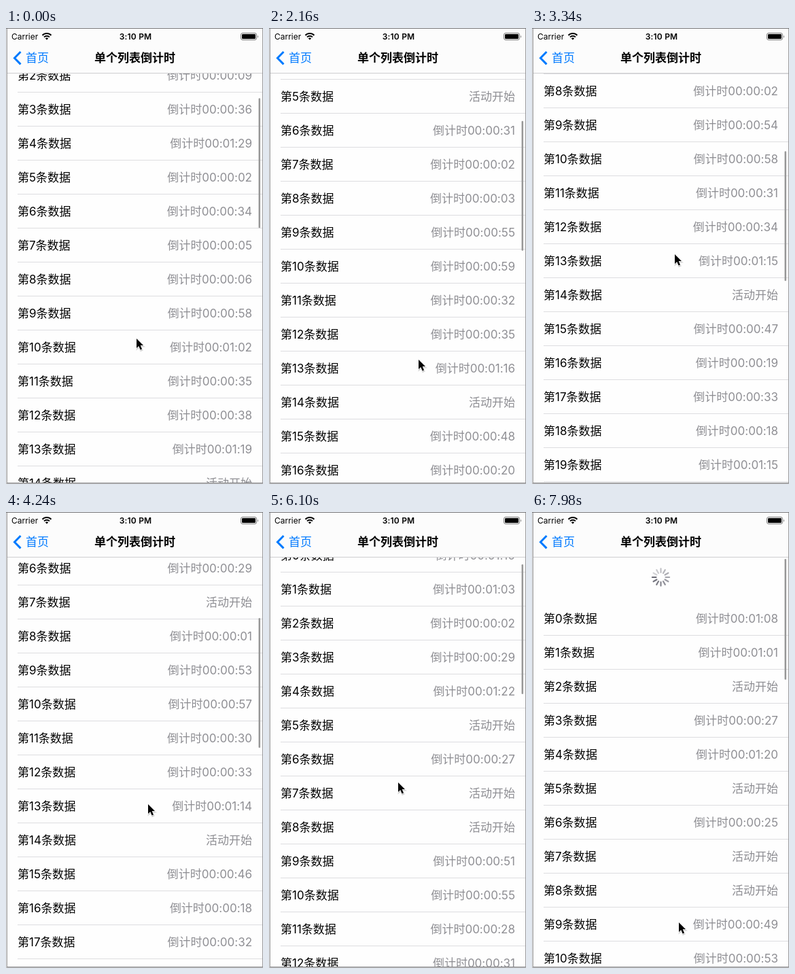
Animation of 378 by 671 pixels, one loop 8000 ms. Source, as an HTML page:

```html
<!DOCTYPE html>
<html lang="zh-CN">
<head>
<meta charset="utf-8">
<title>单个列表倒计时</title>
<style>
  html, body { margin: 0; width: 100%; height: 100%; overflow: hidden; background: #fff; }
  svg { display: block; }
  text { font: 17px Inter, "Noto Sans CJK SC", "Noto Sans CJK", sans-serif; font-feature-settings: "calt" 0; }
  .title { font-weight: 600; text-anchor: middle; }
  .status { font-size: 12px; }
  .clock { font-weight: 600; text-anchor: middle; letter-spacing: .2px; }
  .left { text-anchor: end; fill: #8e8e93; }
  .blue { fill: #007aff; }
</style>
</head>
<body>
<svg width="378" height="671" viewBox="0 0 378 671">
  <defs><clipPath id="view"><rect x="2" y="67" width="375" height="602"/></clipPath></defs>
  <rect width="378" height="671" fill="#fefefe"/>
  <g clip-path="url(#view)">
    <g id="spinner" transform="translate(189.5 96)" stroke="#6b6b76" stroke-width="2.2" stroke-linecap="round"></g>
    <g id="list"></g>
    <rect id="bar" x="371.5" width="2.5" rx="1.25" fill="#989898"/>
  </g>

  <rect width="378" height="66" fill="#fcfcfc"/>
  <rect y="66" width="378" height="1" fill="#cfcfd1"/>
  <text class="status" x="8" y="16.5">Carrier</text>
  <g fill="none" stroke="#000" stroke-width="2">
    <path d="M53.5 10.8a9 9 0 0 1 13 0M56 13.4a5.6 5.6 0 0 1 8 0"/>
    <path d="M60 17.5l-2.2-2.3a3.2 3.2 0 0 1 4.4 0z" fill="#000" stroke="none"/>
  </g>
  <text class="status clock" x="190.5" y="16.5">3:10 PM</text>
  <rect x="345.5" y="7.5" width="23" height="10" rx="2.5" fill="none" stroke="#777"/>
  <rect x="347" y="9" width="20" height="7" rx="1.2"/>
  <path d="M370 10.5q1.8 2 0 4z" fill="#777"/>
  <path d="M21.5 35l-9 9.2 9 9.2" fill="none" stroke="#007aff" stroke-width="3"/>
  <text class="blue" x="29" y="50">首页</text>
  <text class="title" x="189.5" y="50">单个列表倒计时</text>

  <path d="M0 .5H378" stroke="#77777a"/>
  <path d="M.5 1V671" stroke="#dcdcdc"/>
  <path d="M1.5 1V670M377.5 1V670" stroke="#9a9a9c"/>
  <path d="M1 669.5H378" stroke="#88888a"/>
  <path d="M0 670.5H378" stroke="#bcbcbe"/>

  <g id="cursor">
    <path d="M0 0V14L3.2 11 5.6 16.5 8 15.5 5.7 10H10z" transform="translate(.5 1.5)" fill="#0003" stroke="#0002" stroke-width="2"/>
    <path d="M0 0V14L3.2 11 5.6 16.5 8 15.5 5.7 10H10z" stroke="#fff" stroke-width="1.6" paint-order="stroke"/>
  </g>
</svg>
<script>
const LOOP = 8000, TOP = 92, ROW = 50, RELEASE = 7250;
const seconds = [77, 70, 9, 36, 89, 2, 34, 5, 6, 58, 62, 35, 38, 79, 0, 51, 23, 37, 22, 79, 44];

// [time, centre of the first row]
const scrollKeys = [[0, -30], [830, -109], [1160, -109], [2160, -149], [2750, -235], [3340, -307],
  [3420, -309], [4240, -217], [4900, -88], [5500, 8], [6100, 64], [6600, 138], [7110, 207],
  [RELEASE, 212], [7450, 188], [7700, 164], [7980, 157]];
// [time, x], [time, y] of the pointer tip
const xKeys = [[0, 192], [1000, 200], [2160, 220], [3340, 210], [4240, 209], [6100, 190], [7110, 207], [7980, 216]];
const yKeys = [[0, 457], [830, 378], [1160, 378], [1800, 495], [2160, 488], [3340, 333], [3420, 331],
  [4240, 430], [4800, 540], [5500, 380], [6100, 398], [7110, 588], [7300, 604], [7980, 604]];

const $ = id => document.getElementById(id);
const clamp = v => Math.max(0, Math.min(1, v));
const pad = n => String(n).padStart(2, "0");

function add(parent, tag, attrs, text = "") {
  const el = document.createElementNS("http://www.w3.org/2000/svg", tag);
  for (const k in attrs) el.setAttribute(k, attrs[k]);
  el.textContent = text;
  return parent.appendChild(el);
}

// Monotone cubic interpolation through the keys
function curve(keys, t) {
  const last = keys.length - 1;
  if (t >= keys[last][0]) return keys[last][1];
  const i = keys.findIndex(k => k[0] > t) - 1;
  const secant = j => (keys[j + 1][1] - keys[j][1]) / (keys[j + 1][0] - keys[j][0]);
  const slope = j => {
    if (j === 0) return secant(0);
    if (j === last) return secant(last - 1);
    const a = secant(j - 1), b = secant(j);
    return a * b > 0 ? 2 * a * b / (a + b) : 0;
  };
  const [t0, a] = keys[i], [t1, b] = keys[i + 1];
  const h = t1 - t0, u = (t - t0) / h, v = 1 - u;
  return v * v * ((1 + 2 * u) * a + u * h * slope(i)) + u * u * ((3 - 2 * u) * b - v * h * slope(i + 1));
}

const labels = seconds.map((_, n) => {
  const y = n * ROW, list = $("list");
  add(list, "text", { x: 17, y: y + 6 }, `第${n}条数据`);
  add(list, "rect", { x: 17, y: y + 24, width: 361, height: 1, fill: "#dddde0" });
  return add(list, "text", { class: "left", x: 362, y: y + 6 });
});

const petals = Array.from({ length: 12 }, (_, i) =>
  add($("spinner"), "line", { y1: -7, y2: -12.6, transform: `rotate(${i * 30})` }));

function remaining(s) {
  return s > 0 ? `倒计时00:${pad(Math.floor(s / 60))}:${pad(s % 60)}` : "活动开始";
}

function draw(t) {
  const first = Math.round(curve(scrollKeys, t)), pull = first - TOP;
  $("list").setAttribute("transform", `translate(0 ${first})`);

  const elapsed = t < 30 ? 0 : 1 + Math.floor((t + 20) / 1000);
  labels.forEach((el, n) => {
    const text = remaining(seconds[n] - elapsed);
    if (el.textContent !== text) el.textContent = text;
  });

  // The bar shrinks while the list is pulled past its top
  const inset = 52 * clamp((t - RELEASE) / 300);
  $("bar").setAttribute("y", 69 + Math.max(0, -pull) * 0.2815);
  $("bar").setAttribute("height", 191 - Math.max(0, pull - inset) * 1.026);

  // Petals appear one by one, then spin after the release
  const head = 9 + Math.floor((t - 7980) / 83);
  petals.forEach((el, i) => {
    const age = ((head - i) % 12 + 12) % 12;
    el.setAttribute("opacity", t < RELEASE ? clamp((pull - 40 - i * 5) / 5) : 1 - 0.065 * age);
  });

  $("cursor").setAttribute("transform",
    `translate(${Math.round(curve(xKeys, t))} ${Math.round(curve(yKeys, t))})`);
}

function frame() {
  draw(performance.now() % LOOP);
  requestAnimationFrame(frame);
}
frame();
</script>
</body>
</html>
```
